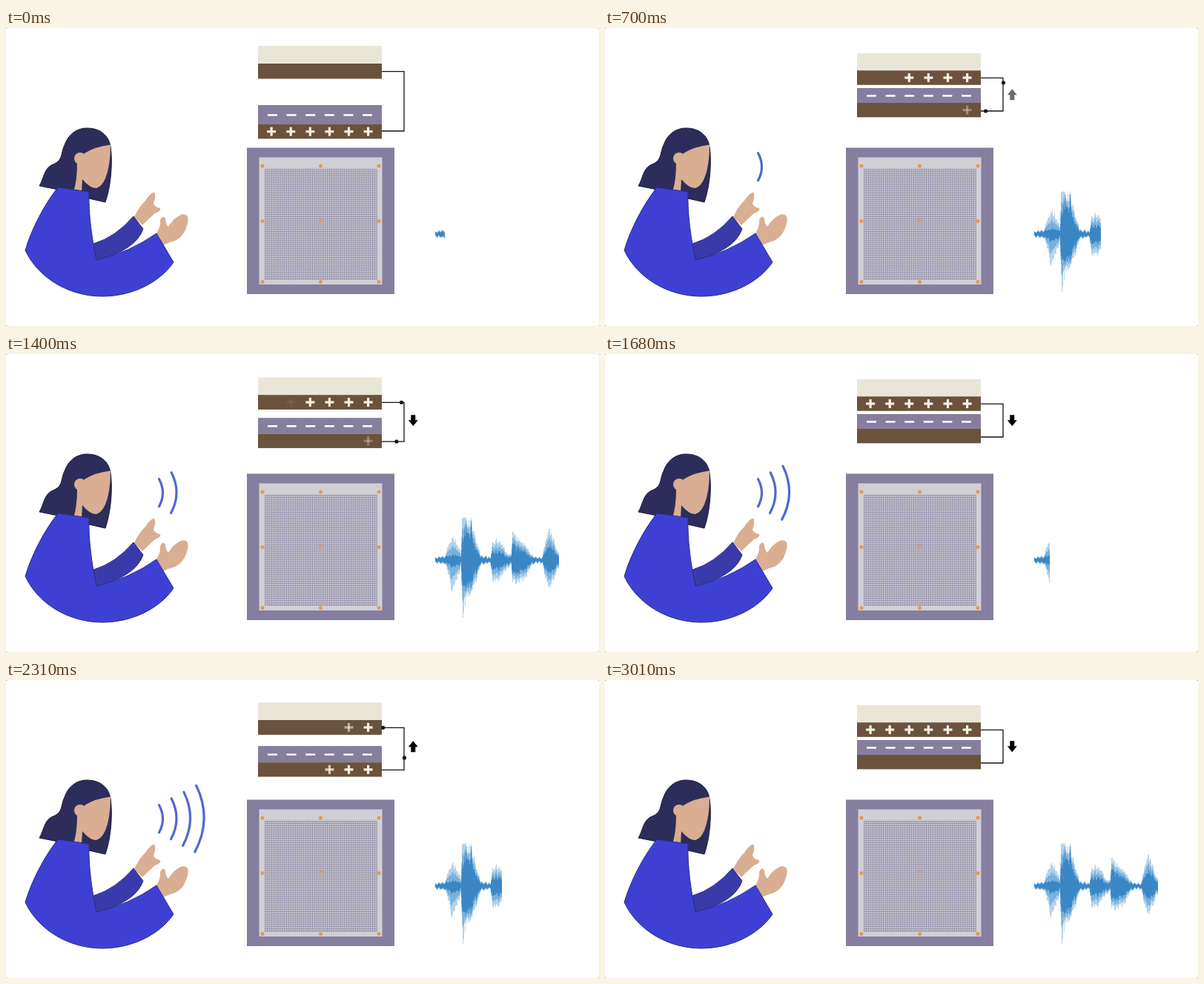
Write an HTML page with a canvas that moves like this. It is 800x402 px and loops after 3080 ms.

```html
<!DOCTYPE html>
<html lang="en">
<head>
<meta charset="utf-8">
<title>Sound-driven generator</title>
<style>
html, body { margin: 0; width: 100%; height: 100%; overflow: hidden; background: #777; }
canvas { display: block; border-radius: 2px; }
</style>
</head>
<body>
<canvas id="stage" width="800" height="402"></canvas>
<script>
const ctx = document.getElementById('stage').getContext('2d');
const LOOP = 3080, STEP = 70, SWEEP = 1540;
const BROWN = '#6b523c', PURPLE = '#857e9e', CREAM = '#e9e6d8', SKIN = '#d9ae92';
const LEFT = 340, WIDTH = 167, WIRE_X = 537;

const clamp = (v, lo = 0, hi = 1) => Math.min(hi, Math.max(lo, v));
const ease = k => (1 - Math.cos(Math.PI * clamp(k))) / 2;
const rect = (color, x, y, w, h) => { ctx.fillStyle = color; ctx.fillRect(x, y, w, h); };
const disc = (color, x, y, r) => {
  ctx.fillStyle = color;
  ctx.beginPath();
  ctx.arc(x, y, r, 0, 7);
  ctx.fill();
};
const shape = (d, fill, stroke, width = 1) => {
  const path = new Path2D(d);
  if (fill) { ctx.fillStyle = fill; ctx.fill(path); }
  if (stroke) { ctx.strokeStyle = stroke; ctx.lineWidth = width; ctx.stroke(path); }
};

// Plate strokes: gap eases between two sizes while charge flows at a steady rate.
const strokes = [
  { at: 0, up: false, from: 0, to: 400, gap: [35, 4], flow: 0, rate: .021 },
  { at: 480, up: true, from: 700, to: 1200, gap: [4, 22.5], flow: .69, rate: .00865 },
  { at: 1200, up: false, from: 1200, to: 1546, gap: [22.5, 4], flow: 2.3, rate: .02 },
  { at: 1729, up: true, from: 1920, to: 2730, gap: [4, 27], flow: 0, rate: .00865 },
  { at: 2730, up: false, from: 2730, to: 3010, gap: [27, 4], flow: 0, rate: .03 }
];

function drawWoman() {
  shape('M45 213C51 203 51 191 61 185C78 179 73 170 79 158C84 143 96 135 109 135C128 135 139 146 141 160C144 180 142 212 134 235L112 230L70 218Z', '#2c2d5b', '#1b1b3a');
  shape('M96 182Q96 206 91 221L102 221L103 204Q114 217 122 216Q129 214 134 203Q141 186 141 157.500Q120 160 106 169Z', SKIN);
  disc(SKIN, 100, 176, 8);
  shape('M173 255Q180 240 188 233Q194 223 200 221.500Q203 226 199 237Q201 242 208 243Q210 247 201 250Q193 257 184 266Z', SKIN);
  shape('M203 277Q209 267 208 259Q212 251 215 257Q215 264 219 268Q226 256 237 251.500Q248 250 245 263Q241 281 228 287Q218 290 212 293Z', SKIN);
  shape('M118 291Q148 282 172 254L185 271Q175 300 122 313Z', '#3a3bab', '#252a80');
  shape('M70 215L112 221C111 250 116 285 122 313Q166 303 203 277L226 316C206 345 168 362 130 362C88 362 45 340 26 300C33 275 50 240 70 215Z', '#3e40d4', '#2a2d86');
}

function drawPanel() {
  rect(PURPLE, 325, 161.5, 199, 197.5);
  rect('#d0cfd5', 341.5, 174.5, 166, 171.5);
  rect('#c6c5cd', 349, 188, 151, 1);
  ctx.fillStyle = '#9c97ae';
  for (let d = 0; d < 151; d += 2.9) {
    ctx.fillRect(349 + d, 190, 1.1, 150);
    if (d < 150) ctx.fillRect(349, 190 + d, 151, 1.1);
  }
  for (const x of [346, 424.5, 503])
    for (const y of [186, 260.5, 342.5])
      if (x !== 424.5 || y !== 260.5) disc('#e69a4e', x, y, 2.5);
  rect('#e69a4e', 422, 258, 5, 1.5);
  rect('#e69a4e', 423.7, 258, 1.6, 5);
}

// Right-aligned row of plus signs; the leftmost one may be partly faded.
function drawPluses(count, y) {
  for (let i = 0; i < 6; i++) {
    const x = 488.6 - i * 26.1;
    ctx.globalAlpha = clamp(count - i);
    rect('#f5efe4', x - 6, y - 1.6, 12, 3.2);
    rect('#f5efe4', x - 1.6, y - 6, 3.2, 12);
  }
  ctx.globalAlpha = 1;
}

function drawArrow(up, alpha) {
  ctx.save();
  ctx.globalAlpha = alpha;
  ctx.translate(549.3, 89.7);
  if (!up) ctx.scale(1, -1);
  shape('M0 -7.500L6.500 .5H3V7.500H-3V.5H-6.500Z', '#000');
  ctx.restore();
}

// Point at distance fraction f along the wire, top plate to bottom plate.
function wirePoint(f, y0, y1) {
  const side = WIRE_X - 507, s = f * (2 * side + y1 - y0);
  if (s < side) return [507 + s, y0];
  if (s < side + y1 - y0) return [WIRE_X + .5, y0 + s - side];
  return [WIRE_X - (s - side - y1 + y0), y1];
}

function drawGenerator(t) {
  const s = strokes.filter(k => k.at <= t).pop();
  const gap = s.gap[0] + (s.gap[1] - s.gap[0]) * ease((t - s.from) / (s.to - s.from));
  const flow = s.flow + s.rate * (t - s.at), open = (gap - 4) / 31;
  const y = 34 - 10 * open, top = y + 23.3 + .7 * open, topEnd = top + 19.5 + open;
  const film = 81 + 23 * open, base = film + 20 + 6 * open;
  const yTop = (top + topEnd) / 2, yBase = base + 9.7;
  const wireTop = yTop + .3, wireEnd = base + 11 - 2 * open;

  rect(CREAM, LEFT, y, WIDTH, top - y);
  rect(BROWN, LEFT, top, WIDTH, topEnd - top);
  rect(PURPLE, LEFT, film, WIDTH, base - film);
  rect(BROWN, LEFT, base, WIDTH, 19.4);
  for (let i = 0; i < 6; i++) rect('#fff', 353 + i * 25.6, (film + base) / 2 - .8, 13, 2.5);

  const giver = 6.6 - flow, taker = flow - 2.25;
  drawPluses(s.up ? giver : taker, yTop);
  drawPluses(s.up ? taker : giver, yBase);

  shape(`M507 ${wireTop}H${WIRE_X}V${wireEnd}H507`, null, '#15121a', 1.3);
  for (let j = 1; j <= 6; j++) {
    const f = (flow - j) / 1.7;
    if (f >= 0 && f <= 1) disc('#17151f', ...wirePoint(s.up ? f : 1 - f, wireTop, wireEnd), 2.6);
  }
  drawArrow(s.up, clamp((t - s.at) / (s.up ? 380 : 140)));
}

function drawArcs(t) {
  const count = t < 2800 ? Math.floor(t / 560) : 0;
  ctx.lineCap = 'round';
  for (let i = 0; i < count; i++) {
    const x = 206.5 + i * 16.7, h = 18.5 + i * 8.8, bulge = 10 + i * 4;
    shape(`M${x} ${187.2 - h}Q${x + bulge} 187.200 ${x - i * .6} ${187.2 + h}`, null, '#5168d2', 3.2);
  }
  ctx.lineCap = 'butt';
}

// Sound envelope: x, height above, height below, share of the darker core.
const envelope = [
  [579, 4, 4, .7], [592, 6, 6, .7], [596, 22, 20, .3], [601, 32, 46, .25], [606, 30, 34, .3],
  [613, 11, 13, .4], [614.5, 58, 50, .6], [616, 70, 80, .55], [620, 60, 56, .85], [627, 58, 46, .85],
  [633, 32, 32, .6], [640, 7, 7, .7], [653, 4, 4, .8], [656, 29, 30, .5], [662, 28, 34, .5],
  [668, 25, 22, .5], [675, 10, 12, .5], [681, 8, 8, .6], [683, 40, 36, .75], [691, 30, 33, .65],
  [699, 23, 28, .6], [707, 10, 11, .6], [713, 4, 4, .8], [723, 4, 4, .8], [727, 30, 25, .5],
  [733, 45, 42, .5], [739, 28, 28, .6], [743, 13, 13, .6], [760, 4, 4, .8]
];
let seed = 7;
const random = () => (seed = seed * 16807 % 2147483647) / 2147483647;
const bars = [];
for (let x = 579; x < 760; x++) {
  const i = envelope.findIndex(e => e[0] > x), a = envelope[i - 1], b = envelope[i];
  const mix = n => a[n] + (b[n] - a[n]) * (x - a[0]) / (b[0] - a[0]);
  const up = mix(1) * (.75 + .25 * random()), down = mix(2) * (.75 + .25 * random());
  const core = mix(3) * (.75 + .25 * random());
  bars.push([x, up, down, core, Math.sin(x * 1.3)]);
}

function drawWave(t) {
  const u = t < SWEEP ? t + STEP : t - SWEEP, end = 584 + u * .11;
  for (const [x, up, down, core, sway] of bars) {
    if (x >= end) break;
    const bar = (color, k) => rect(color, x, 278 - up * k + sway, 1, (up + down) * k);
    bar('#b4d3ea', 1);
    bar('#79b1dd', (1 + core) / 2);
    bar('#3b87c6', core);
  }
}

function draw(now) {
  const t = Math.floor(now % LOOP / STEP) * STEP;
  rect('#fff', 0, 0, 800, 402);
  drawWoman();
  drawPanel();
  drawGenerator(t);
  drawArcs(t);
  drawWave(t);
}

const start = performance.now();
function tick() {
  draw(performance.now() - start);
  requestAnimationFrame(tick);
}
tick();
</script>
</body>
</html>
```
